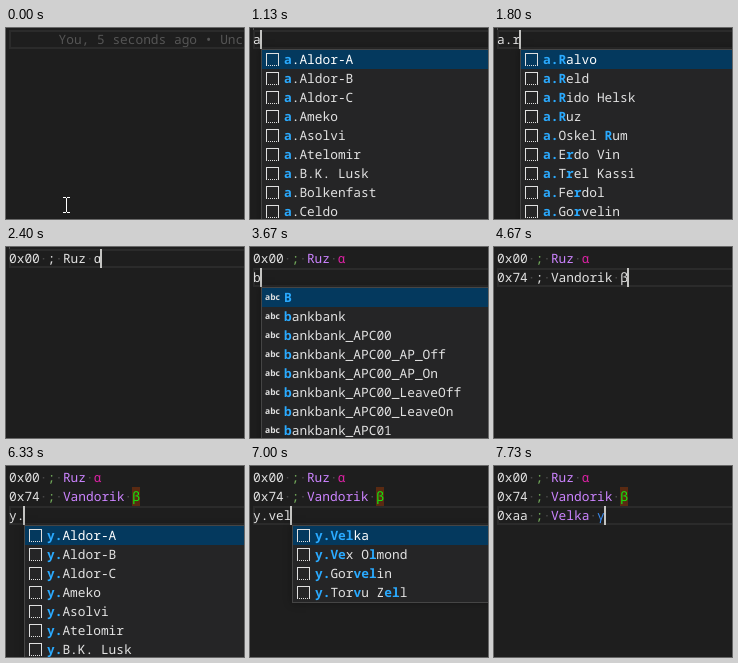
Recreate the animation shown at these times as an HTML page with a canvas. Size 238 px wide and 191 px high, loop 8 s.

```html
<!DOCTYPE html>
<html lang="en">
<head>
<meta charset="utf-8">
<title>Editor completion</title>
<style>
html, body { margin: 0; width: 100%; height: 100%; overflow: hidden; background: #1e1e1e; }
canvas { display: block; }
</style>
</head>
<body>
<canvas id="stage" width="238" height="191"></canvas>
<script>
const ctx = document.getElementById('stage').getContext('2d');
const W = 238, H = 191, LOOP = 8000;
const CW = 7.7, LH = 19, LEFT = 3, TOP = 2, BASE = 14;
const FONT = '12.83px "Noto Sans Mono", "DejaVu Sans Mono", monospace';
const FG = '#e2e2e2', BLUE = '#2aaaff';

const names = ['Aldor-A', 'Aldor-B', 'Aldor-C', 'Ameko', 'Asolvi', 'Atelomir', 'B.K. Lusk',
  'Bolkenfast', 'Celdo', 'Duvent', 'Erdo Vin', 'Ferdol', 'Gorvelin', 'Havetti', 'Merkun Zoph',
  'Novek', 'Oskel Rum', 'Ralvo', 'Reld', 'Rido Helsk', 'Ruz', 'Torvu Zell', 'Trel Kassi',
  'Vandorik', 'Velka', 'Vex Olmond', 'Vorhan Dulmish'];
const words = ['B', 'bankbank', ...['', '_AP_Off', '_AP_On', '_LeaveOff', '_LeaveOn']
  .map(s => 'bankbank_APC00' + s), 'bankbank_APC01', 'bankbank_APC01_AP_Off'];

// Each line: typed keys with their times, then the accepted completion.
const lines = [
  { start: 0, keys: 'a.ruz', times: [1130, 1530, 1800, 1930, 2000], accept: 2400,
    code: '0x00', name: 'Ruz', mark: 'α', color: '#dc22a4' },
  { start: 3200, keys: 'b.van', times: [3670, 3930, 4070, 4200, 4330], accept: 4670,
    code: '0x74', name: 'Vandorik', mark: 'β', color: '#10f010', back: '#5a2a12' },
  { start: 5400, keys: 'y.vel', times: [6130, 6330, 6730, 6800, 7000], accept: 7670,
    code: '0xaa', name: 'Velka', mark: 'γ', color: '#3b8cf0' }
];
const inputs = lines.flatMap(l => [l.start || -530, ...l.times, l.accept]);

const colX = n => LEFT + n * CW;
const lineY = n => TOP + n * LH;

function rect(x, y, w, h, color) {
  ctx.fillStyle = color;
  ctx.fillRect(x, y, w, h);
}

function text(s, x, y, color, weight = 500) {
  ctx.font = `${weight} ${FONT}`;
  ctx.fillStyle = color;
  ctx.fillText(s, x, y);
}

// Positions of the query letters inside a name, or null.
function fuzzy(name, query) {
  const low = name.toLowerCase(), hits = [];
  let at = -1;
  for (const c of query) {
    at = low.indexOf(c, at + 1);
    if (at < 0) return null;
    hits.push(at);
  }
  return hits;
}

function rank(name, hits) {
  if (!hits.length) return 0;
  return name[hits[0] - 1] === ' ' ? 0.5 : hits[0];
}

function complete(typed) {
  if (typed === 'b') return words.map(label => ({ label, hits: [0], word: true }));
  const query = typed.slice(2), lead = [0, 1].slice(0, typed.length);
  return names
    .map(name => ({ name, found: fuzzy(name, query) }))
    .filter(m => m.found)
    .sort((a, b) => rank(a.name, a.found) - rank(b.name, b.found))
    .map(m => ({ label: typed[0] + '.' + m.name, hits: [...lead, ...m.found.map(i => i + 2)] }));
}

function icon(x, y, word) {
  if (word) {
    ctx.font = 'bold 8.5px "Open Sans", "Noto Sans", sans-serif';
    ctx.fillStyle = '#e0e0e0';
    ctx.fillText('abc', x - 1, y + 12);
    return;
  }
  rect(x, y + 3, 13, 1, '#e0e0e0');
  rect(x, y + 3, 1, 13, '#e0e0e0');
  rect(x + 12, y + 3, 1, 13, '#e0e0e0');
  for (let i = 0; i < 13; i += 2) rect(x + i, y + 15, 1, 1, '#e0e0e0');
}

function widget(typed, row) {
  const items = complete(typed).slice(0, 12);
  const x = Math.round(colX(typed.length)), y = lineY(row + 1);
  const h = items.length * LH + 2;
  ctx.save();
  ctx.shadowColor = 'rgba(0,0,0,.36)';
  ctx.shadowBlur = 8;
  rect(x, y, 430, h, '#454545');
  ctx.restore();
  rect(x + 1, y + 1, 428, h - 2, '#252526');
  items.forEach((item, i) => {
    const top = y + 1 + i * LH;
    if (top > H) return;
    if (i === 0) rect(x + 1, top, 428, LH, '#04395e');
    icon(x + 5, top, item.word);
    [...item.label].forEach((c, j) => {
      const hit = item.hits.includes(j);
      text(c, x + 23 + j * CW, top + BASE, hit ? BLUE : i ? FG : '#fff', hit ? 700 : 500);
    });
  });
}

function accepted(l, row, age) {
  const y = lineY(row), base = y + BASE, lit = age >= 60;
  const end = 8 + l.name.length;
  if (l.back && age >= 260) rect(Math.round(colX(end)), y, 8, LH, l.back);
  text(l.code, colX(0), base, FG);
  text(';', colX(5), base, lit ? '#74ac5c' : FG);
  text(l.name, colX(7), base, lit ? '#cc84ff' : FG);
  text(l.mark, colX(end), base, lit ? l.color : FG);
  for (const c of [4, 6, end - 1]) rect(colX(c) + 3, base - 5, 1.5, 1.5, '#484848');
  return end + 1;
}

function pointer(t) {
  const step = Math.floor(t / 66.6) * 66.6;
  let x, y;
  if (t < 670) {
    const p = Math.min(1, Math.max(0, step / 530));
    const e = p * p * (3 - 2 * p);
    x = 60 - 10 * e;
    y = 177 - 91 * e;
  } else {
    [x, y] = t < 730 ? [58, 44] : [67, 11];
  }
  x = Math.round(x);
  y = Math.round(y);
  rect(x, y - 7, 1, 14, '#fff');
  for (const s of [-8, 7]) {
    rect(x - 3, y + s, 3, 1, '#fff');
    rect(x + 1, y + s, 3, 1, '#fff');
  }
}

function draw(t) {
  rect(0, 0, W, H, '#1e1e1e');
  const row = lines.filter(l => t >= l.start).length - 1;
  const now = lines[row];
  const typed = now.keys.slice(0, now.times.filter(k => t >= k).length);

  ctx.strokeStyle = '#2b2b2b';
  ctx.lineWidth = 2;
  ctx.strokeRect(4, lineY(row) + 1, 300, LH - 2);
  if (row === 0 && typed) rect(3, 0, 1, 2, '#505050');

  let col = 0;
  lines.slice(0, row + 1).forEach((l, i) => {
    col = 0;
    if (t >= l.accept) col = accepted(l, i, t - l.accept);
  });
  if (t < now.accept) {
    text(typed, colX(0), lineY(row) + BASE, FG);
    col = typed.length;
  }
  if (!typed) {
    if (row === 0) text('You, 5 seconds ago • Uncommitted changes', 52.5, lineY(0) + BASE, '#555');
    if (row === 2 && t >= 5800) text('You, just now', 52.5, lineY(2) + BASE, '#555');
  }

  const last = Math.max(...inputs.filter(k => t >= k));
  if ((t - last) % 1060 < 530) {
    rect(Math.max(LEFT, Math.floor(colX(col) - 0.6)), lineY(row), 2, LH, '#c4c4c2');
  }
  if (typed && t < now.accept) widget(typed, row);
  if (t < lines[0].times[0]) pointer(t);
}

ctx.textRendering = 'geometricPrecision';
const begin = performance.now();
function frame() {
  draw((performance.now() - begin) % LOOP);
  requestAnimationFrame(frame);
}
frame();
</script>
</body>
</html>
```
